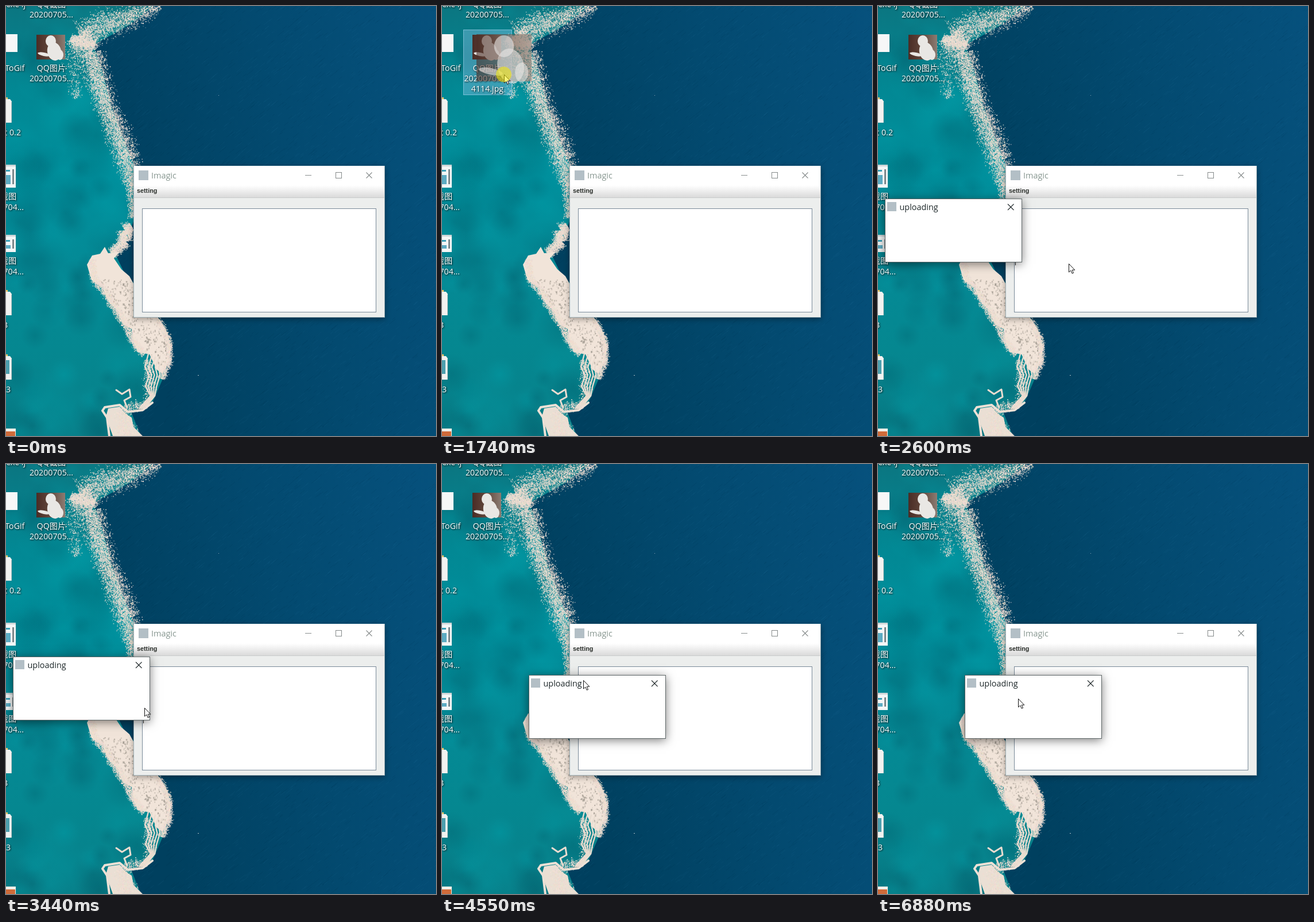
Recreate the animation shown at these times as an HTML page with a canvas. Size 749x748 px, loop 8 s.

```html
<!DOCTYPE html>
<html lang="en">
<head>
<meta charset="utf-8">
<title>Upload by drag and drop</title>
<style>
html, body { margin: 0; width: 100%; height: 100%; overflow: hidden; background: #04496f; }
canvas { display: block; }
</style>
</head>
<body>
<canvas id="stage" width="749" height="748"></canvas>
<script>
const W = 749, H = 748, LOOP = 8000;
const UI = '"Open Sans", "Noto Sans CJK SC", "Noto Sans CJK", sans-serif';
const stage = document.getElementById('stage').getContext('2d');
const desktop = document.createElement('canvas');
desktop.width = W;
desktop.height = H;

let seed = 7;
const rnd = () => {
  seed = (seed + 0x6D2B79F5) | 0;
  let t = Math.imul(seed ^ (seed >>> 15), 1 | seed);
  t = (t + Math.imul(t ^ (t >>> 7), 61 | t)) ^ t;
  return ((t ^ (t >>> 14)) >>> 0) / 4294967296;
};
const spread = () => (rnd() + rnd() + rnd() - 1.5) / 1.2;

function rect(c, x, y, w, h, fill) {
  c.fillStyle = fill;
  c.fillRect(x, y, w, h);
}

function frame(c, x, y, w, h, color) {
  c.strokeStyle = color;
  c.lineWidth = 1;
  c.strokeRect(x + .5, y + .5, w - 1, h - 1);
}

function trace(c, points) {
  c.beginPath();
  for (let i = 0; i < points.length; i += 2) c.lineTo(points[i], points[i + 1]);
}

function line(c, points, color, width = 1) {
  trace(c, points);
  c.strokeStyle = color;
  c.lineWidth = width;
  c.stroke();
}

function text(c, s, x, y, color, font = '14.4px ' + UI, align = 'left') {
  c.font = font;
  c.textAlign = align;
  c.fillStyle = color;
  c.fillText(s, x, y);
}

function label(c, s, x, y, align = 'center') {
  c.save();
  c.shadowColor = '#000';
  c.shadowBlur = 3;
  c.shadowOffsetX = c.shadowOffsetY = 1;
  text(c, s, x, y, '#fff', '14.2px ' + UI, align);
  c.restore();
}

function linear(c, x0, y0, x1, y1, ...colors) {
  const g = c.createLinearGradient(x0, y0, x1, y1);
  colors.forEach((color, i) => g.addColorStop(i / (colors.length - 1), color));
  return g;
}

// ---- wallpaper ----
const COAST = [0,0, 258,0, 215,33, 152,68, 167,110, 182,170, 202,225, 224,280, 222,375, 212,402,
  190,430, 205,462, 225,485, 262,541, 285,592, 279,635, 255,690, 218,706, 235,748, 0,748];
const FOAM = [141,450, 150,434, 164,431, 172,419, 178,430, 197,428, 188,439, 201,458, 215,470, 226,490,
  264,541, 278,562, 288,596, 283,622, 272,640, 262,632, 250,606, 230,602, 222,586, 219,562,
  204,553, 196,532, 179,514, 168,489, 149,477];

// Each stop of a speckle band is x, y, half width.
function speckle(c, band, density) {
  for (let i = 0; i + 5 < band.length; i += 3) {
    const [x0, y0, w0, x1, y1, w1] = band.slice(i, i + 6);
    const dx = x1 - x0, dy = y1 - y0, len = Math.hypot(dx, dy);
    for (let n = len * (w0 + w1) * density; n > 0; n--) {
      const u = rnd(), off = spread() * (w0 + (w1 - w0) * u), s = .7 + rnd() * 1.2;
      c.fillStyle = `rgba(${225 + rnd() * 25},${212 + rnd() * 20},${200 + rnd() * 20},${.45 + rnd() * .5})`;
      c.fillRect(x0 + dx * u - dy / len * off, y0 + dy * u + dx / len * off, s, s);
    }
  }
}

function blotches(c, count, xMax, colors, size) {
  for (let i = 0; i < count; i++) {
    const x = rnd() * xMax, y = rnd() * H, r = size * (.5 + rnd());
    const g = c.createRadialGradient(x, y, 0, x, y, r);
    const color = colors[i % colors.length];
    g.addColorStop(0, `rgba(${color},.2)`);
    g.addColorStop(1, `rgba(${color},0)`);
    rect(c, x - r, y - r, 2 * r, 2 * r, g);
  }
}

function wallpaper(c) {
  rect(c, 0, 0, W, H, linear(c, 150, 150, W, 0, '#00405f', '#034a70', '#06517d'));
  for (let i = 0; i < 3500; i++) {
    const x = 130 + rnd() * 620, y = rnd() * H, l = 3 + rnd() * 9;
    line(c, [x, y, x + l, y - l * .8], i % 2 ? 'rgba(70,150,190,.07)' : 'rgba(0,25,50,.09)');
  }
  c.save();
  trace(c, COAST);
  c.clip();
  rect(c, 0, 0, W, H, linear(c, 0, 0, 0, H, '#0b7681', '#028894', '#008f9c', '#048a96', '#058790', '#07808a'));
  blotches(c, 150, 290, ['0,75,90', '0,165,175'], 34);
  c.restore();

  speckle(c, [266,-4,13, 228,16,22, 180,28,27, 128,52,28], .4);
  speckle(c, [125,50,26, 148,80,25, 160,130,24, 177,180,21, 195,225,25, 212,268,24, 219,312,14, 221,368,9], .55);
  speckle(c, [120,60,26, 118,110,22, 122,160,10], .12);
  speckle(c, [155,66,8, 128,62,12, 112,55,10], 1);
  speckle(c, [218,383,9, 207,390,15, 207,408,13, 184,430,9], 1.6);

  trace(c, FOAM);
  c.fillStyle = '#f1e4d9';
  c.fill();
  c.save();
  c.clip();
  for (let i = 0; i < 420; i++) {
    const y = 475 + rnd() * 160, x = 150 + (y - 465) * .72 + rnd() * 60;
    rect(c, x, y, 1 + rnd() * 2, 1 + rnd() * 3, `rgba(130,125,115,${.15 + rnd() * .4})`);
  }
  c.restore();
  speckle(c, [150,440,7, 152,474,8, 172,496,9, 186,520,9, 207,552,9, 222,585,8, 240,606,8], .9);
  speckle(c, [260,538,7, 283,580,7, 285,615,7, 270,648,9], .9);

  c.lineCap = c.lineJoin = 'round';
  for (let i = 0; i < 5; i++) {
    const k = i * 6;
    line(c, [248 + k, 605 + k / 2, 242 + k, 628, 249 + k * .8, 642, 243 + k * .8, 662, 252 + k * .3, 678, 232 + k * .4, 700],
      '#e9dcd0', 2.4);
  }
  line(c, [255,690, 238,703, 212,706, 198,694, 172,698, 168,704, 176,716, 180,748], '#eee1d6', 4);
  line(c, [192,668, 202,675, 215,667, 217,680, 206,686, 211,699], '#e9dcd0', 3);
  trace(c, [178,700, 198,697, 207,708, 219,716, 222,732, 238,748, 186,748, 174,714]);
  c.fillStyle = '#eadfd4';
  c.fill();
  speckle(c, [245,615,8, 250,660,12, 245,692,8, 205,700,13, 200,725,22, 212,750,24], .35);
  rect(c, 334, 642, 2, 1, '#a9bcc4');
  rect(c, 370, 155, 1, 1, '#8fa9b5');
}

// ---- desktop icons ----
function thumbnail(c, x, y, w, h) {
  c.save();
  c.translate(x, y);
  c.scale(w / 50, h / 43);
  rect(c, 0, 0, 50, 43, linear(c, 0, 0, 50, 0, '#4a2c25', '#63483d', '#8b7c73'));
  c.fillStyle = '#e9e7e4';
  for (const [ex, ey, rx, ry, a] of [[25, 11, 9, 10, 0], [31, 29, 12, 16, -.2], [13, 34, 11, 3, .2], [41, 35, 6, 9, 0]]) {
    c.beginPath();
    c.ellipse(ex, ey, rx, ry, a, 0, 7);
    c.fill();
  }
  c.restore();
}

function folder(c, y, inside) {
  rect(c, 0, y, 3, 40, '#f0c869');
  c.fillStyle = '#f2f2f0';
  trace(c, [0, y + 3, 7, y + 3, 10, y + 7, 10, y + 44, 0, y + 44]);
  c.fill();
  rect(c, 0, y + 10, 6, 24, inside);
  rect(c, 9, y + 8, 1, 36, '#c6c9c8');
}

function screenshot(c, y, h) {
  rect(c, 0, y, 17, h, '#f4f6f6');
  rect(c, 0, y, 17, 3, '#cfd6d8');
  rect(c, 0, y + 9, 7, 3, '#3aa0b8');
  rect(c, 0, y + 18, 8, h - 24, '#5cabc2');
  rect(c, 11, y + 8, 3, h - 14, '#7d888b');
}

function icons(c) {
  label(c, '.exe ij', 34, 2, 'right');
  label(c, 'QQ截图', 79, 2);
  label(c, '20200705...', 79, 20);

  rect(c, 0, 49, 20, 31, '#f7f7f7');
  label(c, 'ScreenToGif', -7, 113);
  folder(c, 159, '#f2f2f0');
  label(c, 't 0.2', 26, 225, 'right');
  for (const [y, h, base] of [[276, 40, 336], [398, 30, 448]]) {
    screenshot(c, y, h);
    label(c, 'QQ截图', -7, base);
    label(c, '20200704...', -7, base + 18.5);
  }
  folder(c, 494, '#f2f2f0');
  label(c, '3', 3, 560, 'right');
  folder(c, 606, '#4d9fae');
  label(c, '3', 8, 672, 'right');
  rect(c, 0, 735, 17, 13, '#f3efe9');
  rect(c, 0, 740, 16, 8, '#cf6b3a');
}

// ---- windows ----
function panel(c, x, y, w, h, fill, border, blur, alpha) {
  c.save();
  c.shadowColor = `rgba(0,0,0,${alpha})`;
  c.shadowBlur = blur;
  c.shadowOffsetY = 3;
  rect(c, x, y, w, h, fill);
  c.restore();
  frame(c, x, y, w, h, border);
}

function cross(c, x, y, size, color) {
  line(c, [x, y, x + size, y + size], color, 1.1);
  line(c, [x + size, y, x, y + size], color, 1.1);
}

function appWindow(c) {
  panel(c, 222, 278, 438, 264, '#eceeed', '#9fb0b6', 10, .35);
  rect(c, 223, 278, 436, 34, '#fff');
  rect(c, 231, 286, 17, 17, '#b3bfc6');
  text(c, 'Imagic', 253, 300, '#86968f');
  line(c, [521, 294.5, 532, 294.5], '#8a8f8f');
  frame(c, 574, 289, 11, 11, '#858a8a');
  cross(c, 627.5, 289.5, 10, '#858a8a');
  rect(c, 223, 312, 436, 21, linear(c, 0, 312, 0, 333, '#fff', '#dadada'));
  rect(c, 223, 333, 436, 1, '#c9cccc');
  text(c, 'setting', 228, 325, '#2b2f2b', 'bold 10.8px "Liberation Sans", Arial, sans-serif');
  rect(c, 237, 352, 408, 181, '#fff');
  frame(c, 237, 352, 408, 181, '#7a8a99');
}

function dialog(c, x, y, shadow) {
  panel(c, x, y, 239, 111, '#fff', '#5d6566', 16, shadow);
  rect(c, x + 4, y + 6, 16, 16, '#b3bfc6');
  text(c, 'uploading', x + 25.5, y + 20, '#1c2628');
  cross(c, x + 214, y + 9.5, 10.5, '#20282a');
}

function photoIcon(c, selected) {
  if (selected) {
    rect(c, 37, 41, 85, 114, 'rgba(125,190,225,.45)');
    frame(c, 37, 41, 85, 114, 'rgba(160,210,235,.6)');
  }
  thumbnail(c, 53, 50, 50, 43);
  label(c, 'QQ图片', 79, 113);
  label(c, selected ? '2020070500' : '20200705...', 79, 131);
  if (selected) label(c, '4114.jpg', 79, 149);
}

function cursor(c, x, y, pressed) {
  c.save();
  c.translate(x, y);
  trace(c, [.5,.5, .5,15, 3.8,12, 6.2,17.3, 8.5,16.3, 6.2,11.2, 10.8,11.2]);
  c.closePath();
  c.fillStyle = '#fff';
  c.fill();
  c.strokeStyle = '#111';
  c.lineWidth = 1;
  c.stroke();
  if (pressed) {
    c.beginPath();
    c.arc(-.5, 0, 13.5, 0, 7);
    c.fillStyle = 'rgba(245,235,0,.54)';
    c.fill();
  }
  c.restore();
}

// ---- timeline: time, x, y ----
const POINTER = [[70, 643, 681], [350, 400, 370], [620, 95, 95], [800, 85, 92], [970, 215, 102], [1050, 232, 104],
  [1140, 232, 104], [1350, 150, 165], [1540, 85, 90], [1700, 85, 85], [2140, 332, 448], [2600, 332, 448],
  [2840, 332, 444], [2980, 332, 444], [3290, 241, 424], [3440, 241, 424], [3520, 230, 417], [3690, 230, 417],
  [4240, 107, 344], [4385, 107, 344], [4460, 246, 376], [4550, 246, 376], [5250, 251, 408],
  [6190, 251, 408], [6340, 246, 408], [6800, 246, 408], [6880, 244, 408]];
const DIALOG = [[4385, 12, 335], [4460, 151, 367]];

function at(keys, t) {
  const i = keys.findIndex(k => k[0] > t);
  if (i < 0) return keys[keys.length - 1].slice(1);
  if (i === 0) return keys[0].slice(1);
  const a = keys[i - 1], b = keys[i], u = (t - a[0]) / (b[0] - a[0]);
  return [a[1] + (b[1] - a[1]) * u, a[2] + (b[2] - a[2]) * u];
}

function draw(t) {
  const during = (from, to) => t >= from && t < to;
  const [x, y] = at(POINTER, t).map(Math.round);
  stage.drawImage(desktop, 0, 0);
  photoIcon(stage, during(650, 1140) || during(1580, 2520));
  appWindow(stage);
  if (t >= 2060) rect(stage, 239, 435, 1, 16, '#222');
  if (t >= 2520) dialog(stage, ...at(DIALOG, t).map(Math.round), during(2520, 2600) ? .3 : .5);
  if (during(1740, 2200)) {
    stage.globalAlpha = .6;
    thumbnail(stage, x - 48, y - 70, 96, 82);
    stage.globalAlpha = 1;
  }
  if (t >= 70) {
    cursor(stage, x, y, during(650, 740) || during(1050, 1140) || during(1580, 2200) || during(4300, 4520));
  }
}

const back = desktop.getContext('2d');
wallpaper(back);
icons(back);

const start = performance.now();
function tick() {
  draw((performance.now() - start) % LOOP);
  requestAnimationFrame(tick);
}
tick();
</script>
</body>
</html>
```
